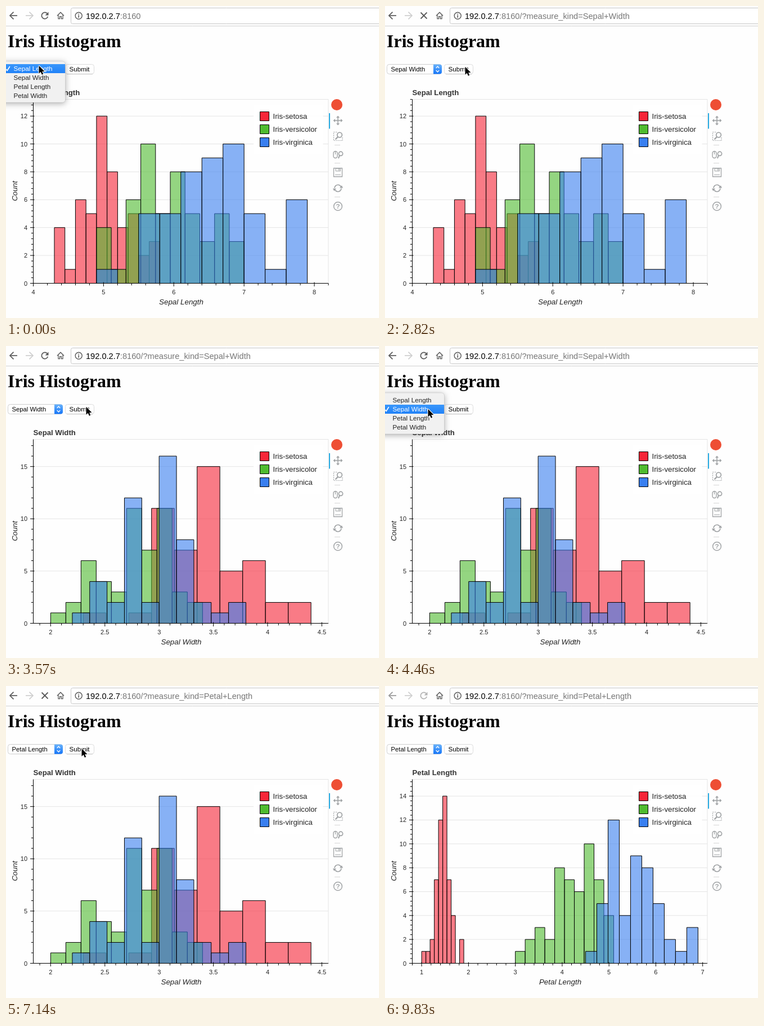
Animation of 663 by 553 pixels, one loop 9.93 s. Source, as an HTML page with a canvas:

```html
<!DOCTYPE html>
<html lang="en">
<head>
<meta charset="utf-8">
<title>Iris Histogram</title>
<style>
html, body { margin: 0; width: 100%; height: 100%; overflow: hidden; background: #fefefe; }
canvas { display: block; width: 663px; height: 553px; }
</style>
</head>
<body>
<canvas id="stage" width="663" height="553"></canvas>
<script>
const ctx = document.getElementById('stage').getContext('2d');
const LOOP = 9930;
const STEP = 148.9; // screen refresh in ms; all times below count these steps
const SANS = '"Liberation Sans", Arial, sans-serif';
const SERIF = '"Liberation Serif", Times, serif';
const HOST = '192.0.2.7', PORT = ':8160', QUERY = '/?measure_kind=';
const FEATURES = ['Sepal Length', 'Sepal Width', 'Petal Length', 'Petal Width'];
const SPECIES = ['Iris-setosa', 'Iris-versicolor', 'Iris-virginica'];
const COLORS = ['247,38,56', '79,187,47', '57,127,240'];
const PLOT = { left: 48.5, right: 573, top: 165.5, bottom: 491.5 };

// Samples per species: low edge, high edge, counts in ten equal bins
const CHARTS = [
  { pad: 0.3, sets: [
    [4.3, 5.8, [4, 1, 6, 5, 12, 8, 4, 5, 2, 3]],
    [4.9, 7.0, [4, 1, 6, 10, 5, 8, 5, 3, 5, 3]],
    [4.9, 7.9, [1, 0, 5, 5, 8, 9, 10, 5, 1, 6]]] },
  { pad: 0.16, sets: [
    [2.3, 4.4, [1, 0, 1, 11, 7, 15, 5, 6, 2, 2]],
    [2.0, 3.4, [1, 2, 6, 4, 3, 11, 7, 11, 3, 2]],
    [2.2, 3.8, [1, 4, 2, 12, 2, 16, 8, 2, 1, 2]]] },
  { pad: 0.2, sets: [
    [1.0, 1.9, [1, 1, 2, 7, 12, 14, 7, 4, 0, 2]],
    [3.0, 5.1, [1, 2, 3, 2, 8, 7, 6, 10, 7, 4]],
    [4.5, 6.9, [1, 5, 12, 4, 9, 8, 5, 2, 1, 3]]] }
];

// Each round picks the next feature in the menu and submits it
const ROUNDS = [
  { open: 0, hover: 2, close: 8, submit: 14, unload: 23, load: 24 },
  { open: 29, hover: 33, close: 37, press: 42, submit: 43, unload: 50, load: 50 }
];

const POINTER_START = { x: 58, y: 105 };
const POINTER_MOVES = [
  { from: 0, to: 4, x: 70, y: 132 },
  { from: 6, to: 12, x: 142, y: 107, bow: 10 },
  { from: 26, to: 30, x: 76, y: 111 },
  { from: 31, to: 34, x: 76, y: 130 },
  { from: 36, to: 40, x: 134, y: 110 },
  { from: 53, to: 56, x: 120, y: 125 },
  { from: 58, to: 60, x: 447, y: 524 }
];
const POINTER_GONE = 62;

const easeOut = p => 1 - (1 - p) ** 3;
const roundsPast = test => ROUNDS.filter(test).length;

function text(str, x, y, size, color, { style = '', align = 'left', family = SANS } = {}) {
  ctx.font = `${style} ${size}px ${family}`;
  ctx.textAlign = align;
  ctx.fillStyle = color;
  ctx.fillText(str, x, y);
  return x + ctx.measureText(str).width;
}

function trace(points) {
  ctx.beginPath();
  for (const [x, y] of points) ctx.lineTo(x, y);
}

function line(points, color, width = 1) {
  trace(points);
  ctx.strokeStyle = color;
  ctx.lineWidth = width;
  ctx.stroke();
}

function shape(points, color) {
  trace(points);
  ctx.fillStyle = color;
  ctx.fill();
}

function arc(x, y, r, color, width = 1, from = 0, to = 2) {
  ctx.beginPath();
  ctx.arc(x, y, r, from * Math.PI, to * Math.PI);
  ctx.strokeStyle = color;
  ctx.lineWidth = width;
  ctx.stroke();
}

function box(x, y, w, h, r, fill, stroke, width = 1) {
  ctx.beginPath();
  ctx.roundRect(x, y, w, h, r);
  if (fill) { ctx.fillStyle = fill; ctx.fill(); }
  if (stroke) { ctx.strokeStyle = stroke; ctx.lineWidth = width; ctx.stroke(); }
}

function fade(y, h, top, bottom) {
  const g = ctx.createLinearGradient(0, y, 0, y + h);
  g.addColorStop(0, top);
  g.addColorStop(1, bottom);
  return g;
}

function navArrow(x, dir, color) {
  line([[x, 17], [x + dir * 13, 17]], color, 1.7);
  line([[x + dir * 6.5, 10.7], [x, 17], [x + dir * 6.5, 23.3]], color, 1.7);
}

function drawBrowser(k) {
  const ink = '#5a5a5a', dim = k >= 66;
  line([[0, 35.5], [663, 35.5]], '#cfcfcf');
  box(115.5, 3.5, 580, 28, 3, '#fff', '#c6c6c6');
  navArrow(7, 1, dim ? '#989898' : ink);
  navArrow(48, -1, '#cecece');

  if (ROUNDS.some(r => k >= r.submit && k < r.unload)) {
    line([[63.5, 11.5], [74.5, 22.5]], ink, 1.8);
    line([[74.5, 11.5], [63.5, 22.5]], ink, 1.8);
  } else {
    const c = dim ? '#b4b4b4' : ink;
    arc(69, 17, 5.6, c, 1.7, 0.1, 1.75);
    shape([[75.5, 10.5], [75.5, 16.5], [69.5, 16.5]], c);
  }
  line([[91, 17.3], [97, 11.3], [103, 17.3]], ink, 1.5);
  line([[93, 16], [93, 22.7], [95.6, 22.7], [95.6, 18.7], [98.4, 18.7], [98.4, 22.7], [101, 22.7], [101, 16]], ink, 1.3);

  arc(129.2, 17.3, 6, ink, 1.4);
  box(128.4, 16.3, 1.6, 4.4, 0, ink);
  box(128.4, 13.7, 1.6, 1.6, 0, ink);

  const shown = roundsPast(r => k >= r.submit + 5);
  const query = shown ? QUERY + FEATURES[shown].replace(' ', '+') : '';
  const x = text(HOST, 142, 22.5, 14.6, '#000');
  text(PORT + query, x, 22.5, 14.6, '#777');
}

function drawForm(k, choice) {
  text('Iris Histogram', 3, 73, 32, '#000', { style: 'bold', family: SERIF });
  box(3.5, 103.5, 97, 17, 4, '#fff', '#cfcfcf');
  box(86, 103.5, 15, 17, [0, 4, 4, 0], fade(103, 18, '#6cb4fb', '#1273f8'));
  for (const dir of [-1, 1]) {
    const y = 112 + dir * 2;
    line([[90.8, y], [93.5, y + dir * 3], [96.2, y]], '#fff', 1.3);
  }
  if (ROUNDS.some(r => k >= r.open && k < r.submit))
    box(3, 103, 98.5, 18, 4.5, null, 'rgba(86,160,240,.75)', 2.2);
  text(FEATURES[choice], 10.5, 116, 11.25, '#000');

  const pressed = ROUNDS.some(r => k === r.press);
  box(105.5, 103.5, 51, 17, 4, pressed ? '#d8d8d8' : '#fff', '#dcdcdc');
  line([[108, 120.7], [154, 120.7]], '#c4c4c4');
  text('Submit', 112.5, 116, 11.6, '#000');
}

// The 1-2-5 step whose tick count comes closest to six
function tickStep(span) {
  const power = 10 ** Math.floor(Math.log10(span / 6));
  const miss = s => Math.abs(span / s - 6);
  return [1, 2, 5, 10].map(s => s * power).reduce((a, b) => miss(b) < miss(a) ? b : a);
}

// Calls back for every tick, five small ones to each large one
function eachTick(low, high, visit) {
  const step = tickStep(high - low), small = step / 5;
  for (let i = Math.ceil(low / small - 0.01); i <= high / small + 0.01; i++)
    visit(i * small, i % 5 === 0);
}

function drawAxes(low, high, top, toX, toY) {
  const { left, right, bottom } = PLOT;
  line([[left, PLOT.top], [left, bottom], [right, bottom]], '#000');
  eachTick(low, high, (v, major) => {
    const x = toX(v);
    line([[x, bottom - (major ? 2 : 0)], [x, bottom + (major ? 5.5 : 3.7)]], '#000');
    if (major) text(String(+v.toFixed(1)), x, 510.5, 11, '#222', { align: 'center' });
  });
  eachTick(0, top, (v, major) => {
    const y = toY(v);
    line([[left - (major ? 5.5 : 3.7), y], [left + (major ? 2 : 0), y]], '#000');
    if (major) text(String(Math.round(v)), 38, y + 4, 11, '#222', { align: 'right' });
  });
}

function drawBars([low, high, counts], color, toX, toY) {
  const bin = (high - low) / counts.length;
  counts.forEach((n, i) => {
    const x = toX(low + i * bin), y = toY(n);
    box(x, y, toX(low + (i + 1) * bin) - x, PLOT.bottom - y, 0, `rgba(${color},.6)`, '#000');
  });
}

function drawChart(index) {
  const { pad, sets } = CHARTS[index], { left, right, top, bottom } = PLOT;
  const low = Math.min(...sets.map(s => s[0])) - pad;
  const high = Math.max(...sets.map(s => s[1])) + pad;
  const peak = Math.max(...sets.flatMap(s => s[2])) * 1.1;
  const toX = v => left + (v - low) / (high - low) * (right - left);
  const toY = v => bottom - v / peak * (bottom - top);

  box(left, top, right - left, bottom - top, 0, null, '#e5e5e5');
  eachTick(0, peak, (v, major) => {
    if (major) line([[left, toY(v)], [right, toY(v)]], '#e5e5e5');
  });
  sets.forEach((set, i) => drawBars(set, COLORS[i], toX, toY));
  drawAxes(low, high, peak, toX, toY);

  box(440, 176, 123.5, 86, 0, 'rgba(255,255,255,.95)');
  SPECIES.forEach((name, i) => {
    const y = 187.5 + i * 23;
    box(451.5, y, 16, 16, 0, `rgb(${COLORS[i]})`, '#000');
    text(name, 474.5, y + 12.2, 13.2, '#222');
  });

  const name = FEATURES[index], label = { style: 'italic', align: 'center' };
  text(name, 48.5, 158, 13.2, '#333', { style: 'bold' });
  text(name, 311.5, 529, 13.4, '#222', label);
  ctx.save();
  ctx.translate(19.5, 328);
  ctx.rotate(-Math.PI / 2);
  text('Count', 0, 0, 13.4, '#222', label);
  ctx.restore();
}

function drawTools() {
  const c = '#a1a4a6';
  ctx.beginPath();
  ctx.arc(588, 175, 10, 0, Math.PI * 2);
  ctx.fillStyle = '#ee4e34';
  ctx.fill();
  line([[575, 190], [575, 217.5]], '#26aae1', 2);

  // pan
  ctx.save();
  ctx.translate(590, 203);
  for (let i = 0; i < 4; i++) {
    line([[0, 0], [0, -6]], c, 1.6);
    shape([[-3, -5], [0, -8.5], [3, -5]], c);
    ctx.rotate(Math.PI / 2);
  }
  ctx.restore();

  // box zoom
  ctx.setLineDash([2, 1.6]);
  line([[588, 223.5], [582.5, 223.5], [582.5, 238.5], [598, 238.5], [598, 233]], c, 1.2);
  ctx.setLineDash([]);
  arc(593, 228.5, 4.3, c, 1.8);
  line([[590, 231.8], [585.5, 236.5]], c, 2.3);

  // wheel zoom
  box(582, 257.5, 7, 12, 3.5, null, c, 1.4);
  line([[585.5, 258], [585.5, 263]], c, 1.2);
  arc(595, 261.8, 3.6, c, 1.7);
  line([[593, 265], [590.8, 270]], c, 1.9);

  // save
  box(582.5, 287.5, 15, 15, 0, null, c, 1.3);
  box(586, 288, 8.5, 4.5, 0, null, c);
  line([[592, 288], [592, 291.5]], c, 1.5);
  line([[585, 299], [595, 299]], c);

  // reset
  ctx.save();
  ctx.translate(590, 323);
  for (let i = 0; i < 2; i++) {
    arc(0, 0, 6, c, 1.7, 1.02, 1.85);
    shape([[3, -0.5], [9, -0.5], [6.8, -5]], c);
    ctx.rotate(Math.PI);
  }
  ctx.restore();

  // help
  arc(590, 355, 7.4, c, 1.5);
  text('?', 590, 359.2, 11.5, c, { style: 'bold', align: 'center' });
  for (const y of [246.5, 278.5, 338.5]) line([[584, y], [594, y]], '#d6d6d6');
}

function drawMenu(k, choice) {
  const round = ROUNDS.find(r => k >= r.open && k < r.close);
  if (!round) return;
  const left = round.close - k; // blinks, then fades before closing
  const hover = left === 2 ? -1 : choice + (k >= round.hover ? 1 : 0);
  const top = 98 - choice * 15;
  ctx.save();
  ctx.globalAlpha = left === 1 ? 0.45 : 1;
  ctx.shadowColor = 'rgba(0,0,0,.32)';
  ctx.shadowBlur = 11;
  ctx.shadowOffsetY = 2;
  box(-12, top, 117.5, 73, 5, '#f1f1f1');
  ctx.shadowColor = 'transparent';
  box(-12, top, 117.5, 73, 5, null, 'rgba(0,0,0,.12)', 0.8);
  FEATURES.forEach((name, i) => {
    const y = top + 5 + i * 16, on = i === hover, color = on ? '#fff' : '#222';
    if (on) box(0, y, 105, 16, 0, fade(y, 16, '#3a97fb', '#2182f8'));
    text(name, 13.5, y + 12.2, 11.7, color);
    if (i === choice) line([[-0.5, y + 8.5], [2.2, y + 11.5], [6.8, y + 4]], color, 1.6);
  });
  ctx.restore();
}

function pointerAt(k) {
  let { x, y } = POINTER_START;
  for (const move of POINTER_MOVES) {
    if (k <= move.from) break;
    const p = easeOut(Math.min(1, (k - move.from) / (move.to - move.from)));
    x += (move.x - x) * p;
    y += (move.y - y) * p + (move.bow || 0) * Math.sin(Math.PI * p);
  }
  return [x, y];
}

function drawPointer(k) {
  if (k >= POINTER_GONE) return;
  const [x, y] = pointerAt(k);
  const tip = [[0, 0], [0, 14], [3.2, 11], [5.4, 16], [7.7, 15], [5.7, 10.2], [10, 10.2], [0, 0]];
  ctx.save();
  ctx.translate(x + 0.5, y + 0.8);
  ctx.lineJoin = 'round';
  line(tip, '#fff', 2);
  shape(tip, '#000');
  ctx.restore();
}

function draw(ms) {
  const k = Math.floor(ms % LOOP / STEP + 0.07);
  const choice = roundsPast(r => k > r.close);
  ctx.fillStyle = '#fefefe';
  ctx.fillRect(0, 0, 663, 553);
  drawBrowser(k);
  drawForm(k, choice);
  if (!ROUNDS.some(r => k >= r.unload && k < r.load)) {
    drawChart(roundsPast(r => k >= r.load));
    drawTools();
  }
  drawMenu(k, choice);
  drawPointer(k);
}

const began = performance.now();
function tick() {
  draw(performance.now() - began);
  requestAnimationFrame(tick);
}
tick();
</script>
</body>
</html>
```
